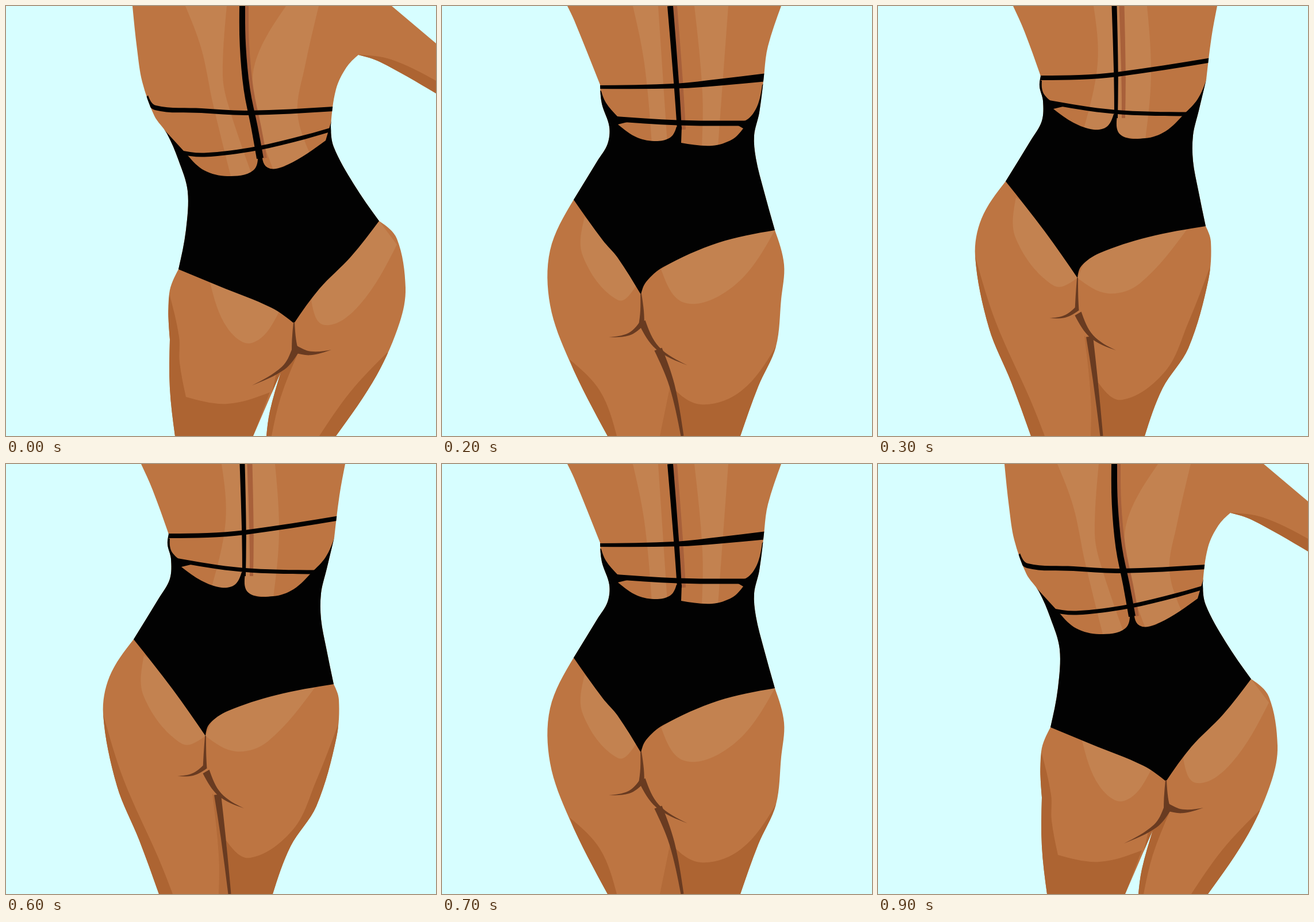
Recreate the animation shown at these times as an HTML page with a canvas. Size 748 by 748 pixels, loop 1 s.

```html
<!DOCTYPE html>
<html lang="en">
<head>
<meta charset="utf-8">
<title>Swimsuit sway</title>
<style>
html, body { margin: 0; width: 100%; height: 100%; overflow: hidden; background: #d7feff; }
canvas { display: block; }
</style>
</head>
<body>
<canvas id="stage" width="748" height="748"></canvas>
<script>
const ctx = document.getElementById('stage').getContext('2d');
const COLORS = {
  sky: '#d7feff', skin: '#bd7542', light: '#c38250', tint: '#b36b39',
  shade: '#ad6432', spine: '#a8603a', crease: '#693b21', suit: '#020202'
};

// Curves run through a few "x,y" key points; "!" marks a sharp corner.
// Ribbons are [curve, start width, end width]. Everything but the crease is
// clipped to the skin, so inner shapes may run past its edge.
const poses = [
  {
    skin: '220,0! 228,75 237,132 258,191 280,222 300,268 316,322 313,390 300,458! 284,500 285,580! 285,665 294,748! 430,748! 478,637! 459,705 453,748! 574,748! 645,642 685,550 695,490 680,405 649,374! 605,310 570,245 565,208! 574,145 592,107 613,85! 650,97 748,152! 748,65! 671,0!',
    suit: '275,215! 308,251! 317,261! 345,286 385,296 430,286 438,252! 445,250! 455,281 490,276 556,234! 566,200! 700,300! 649,374! 600,436 545,492 501,552! 462,525 370,487 300,458! 200,400!',
    spine: ['411,0 412,70 419,145 432,210 442,265', 10, 12], shadow: 6,
    straps: [['244,158 260,177 340,182 420,186 570,179', 8], ['300,254 345,259 435,248 520,228 575,212', 7]],
    light: [
      '312,0! 340,75 360,170 392,300! 430,300! 386,170 377,120 384,0!',
      '487,0! 433,100 434,185 465,285! 530,260! 507,185 520,105 544,0!',
      '355,481! 385,560 428,586 475,532! 430,460!',
      '531,512! 555,555 615,520 680,415! 649,374! 580,420!'
    ],
    tint: [],
    shade: [
      '613,85! 670,93 748,130! 748,165! 640,110!',
      '284,500! 301,575 302,620 313,680! 385,692 459,672! 430,748! 270,748!',
      '664,602! 600,670 545,748! 690,748!',
      '470,640! 507,606! 478,680 462,748! 445,748!'
    ],
    crease: [['501,550 501,580 503,602', 2, 12], ['503,600 482,630 428,660', 13, 0], ['504,597 530,604 566,598', 13, 0]]
  },
  {
    skin: '215,0! 245,110 258,150 286,209 294,250 290,305 245,416! 229,490 229,540 245,627 288,748! 424,748! 423,660 413,598! 417,587! 428,597! 447,685 450,748! 565,748! 615,615 628,470 620,415 599,362! 555,280 547,245 543,184! 541,166! 549,150! 549,115! 570,70 593,45! 640,60 748,79! 748,0!',
    suit: '280,203! 303,237! 335,262 370,268 397,252 402,228! 410,228! 416,261! 470,250 518,225! 535,210! 541,180! 700,280! 599,362! 570,365 500,415 425,478 403,538! 350,493 245,416! 200,300!',
    spine: ['383,0 385,60 396,150 405,215 406,258', 6, 10], shadow: 5,
    straps: [['256,150 268,157 390,165 500,167 530,164 552,150', 7], ['295,230 350,231 430,222 540,211', 8]],
    light: [
      '302,0! 328,110 355,268! 396,268! 367,135 355,0!',
      '449,0! 413,85 428,155 450,262! 468,262! 475,160 505,0!',
      '272,436! 305,540 340,559 385,522! 350,440!',
      '428,485! 470,533 535,500 580,430 597,355! 500,390!'
    ],
    tint: ['229,538! 265,595 330,620 413,592! 365,632! 320,635 243,627! 215,600!'],
    shade: [
      '593,45! 650,40 748,53! 748,95! 640,75!',
      '259,668! 300,710 350,724 405,705 423,655! 435,748! 270,748!',
      '428,597! 440,645 465,688 540,702 606,645! 590,748! 440,748!'
    ],
    crease: [['403,538 411,565 412,590', 1, 10], ['412,586 395,612 364,632', 10, 0], ['411,570 428,597 455,612', 10, 0]]
  },
  {
    skin: '218,0! 230,25 275,137! 278,170 291,210 288,240 270,270 229,337! 188,425 188,520 222,618 288,748! 519,748! 550,662 581,592 590,510 595,450 579,390! 560,322 546,265 543,225 552,185 561,112! 567,70 590,0!',
    suit: '265,140! 277,148! 285,168 305,192! 330,200! 306,206! 340,229 375,235 398,228 408,210! 417,210! 416,238! 470,243 505,232 524,213! 505,202! 530,198 548,175 557,137! 580,120! 700,250! 579,390! 480,412 385,454 355,480 346,502! 305,437 280,408 229,337! 150,250!',
    spine: ['397,0 408,138 413,215', 10, 8], shadow: 7,
    straps: [['265,141 410,139 480,133 565,124', 6, 14], ['295,196 410,203 530,204', 9]],
    light: [
      '332,0! 352,100 365,240! 392,240! 376,0!',
      '439,0! 453,150 452,245! 480,245! 498,0!',
      '248,367! 245,435 305,511 338,486! 320,430!',
      '381,458! 425,517 510,485 579,390! 470,400!'
    ],
    tint: ['379,748! 397,660! 416,748!'],
    shade: [
      '222,615! 275,670 304,748! 270,748!',
      '397,660! 450,693 520,670 581,592! 600,748! 419,748!'
    ],
    crease: [['346,500 348,530 347,556', 2, 10], ['347,553 325,571 290,576', 9, 0], ['348,550 375,595 427,625', 13, 0], ['376,597 400,660 418,748', 14, 5]]
  },
  {
    skin: '235,0! 255,45 283,122! 281,140 287,165 285,200 265,235 222,305! 180,370 169,435 193,560 232,655 266,748! 464,748! 495,665 540,595 575,475 579,410 570,383! 557,320 548,270 548,225 558,182 571,128! 580,55 590,0!',
    suit: '270,125! 285,130! 287,150 300,165! 330,173! 305,179! 340,203 375,215 398,210 410,188! 416,190! 422,224 465,230 500,218 532,188! 556,162 572,126! 700,200! 570,383! 470,402 385,430 354,452 347,473! 290,392 222,305! 150,250!',
    spine: ['411,0 414,118 414,195', 9, 6], shadow: 13,
    straps: [['270,125 350,124 416,119 580,94', 8], ['295,167 410,184 540,188', 7]],
    light: [
      '375,0! 382,100 356,220! 465,232! 475,120 468,0!',
      '240,333! 240,405 305,486 347,473! 300,370!',
      '347,473! 400,500 455,483 540,385! 370,420!'
    ],
    tint: ['359,573! 370,680 370,748! 390,748! 372,590!'],
    shade: [
      '169,435! 205,550 265,685 290,748! 240,748! 150,600!',
      '577,455! 540,550 500,635 425,685 383,655! 390,748! 500,748! 600,600!'
    ],
    crease: [['347,473 346,505 346,530', 2, 7], ['346,527 325,540 298,543', 8, 0], ['348,535 372,575 414,599', 13, 0], ['368,575 378,650 389,748', 12, 5]]
  },
  {
    skin: '237,0! 245,25 278,102! 277,140 288,185 275,218 220,290! 178,375 174,480 187,560 236,672 257,748! 425,748! 455,690 530,595 550,535 575,460 581,405 571,370! 544,275 543,240 552,190 570,120! 575,90! 588,0!',
    suit: '265,105! 279,108! 294,148! 318,160! 306,167! 350,196 391,204! 412,198 417,178! 422,178! 421,211! 475,218 510,207 536,180! 556,155 572,116! 700,200! 571,370! 470,397 385,434 362,455 357,484! 345,432 300,368 220,290! 150,220!',
    spine: ['416,0 421,90 419,185', 7, 6], shadow: 10,
    straps: [['270,104 350,108 420,105 500,99 585,85', 6], ['290,150 417,174 540,181', 7]],
    light: [
      '369,0! 382,100 345,215! 474,220! 480,120 457,0!',
      '231,298! 232,395 300,482 357,484! 340,390!',
      '357,484! 410,495 490,462 532,375! 380,420!'
    ],
    tint: ['363,575! 362,748! 378,748! 375,620!'],
    shade: [
      '172,430! 205,560 258,690 276,748! 200,748! 150,600!',
      '577,450! 515,590 430,695 400,748! 500,748! 600,600!'
    ],
    crease: [['357,484 357,500 353,516', 2, 9], ['354,513 335,529 299,528', 9, 0], ['362,546 383,566 412,580', 9, 0], ['353,514 363,565 383,675 379,748', 9, 4]]
  }
];

function parse(text) {
  return text.split(' ').map(token => {
    const [x, y] = token.split(',').map(parseFloat);
    return { x, y, corner: token.endsWith('!') };
  });
}

// Handle leaving b towards c, parallel to the chord a-c.
function handle(a, b, c) {
  const chord = Math.hypot(c.x - a.x, c.y - a.y) || 1;
  const k = Math.hypot(c.x - b.x, c.y - b.y) / 3 / chord;
  return { x: b.x + (c.x - a.x) * k, y: b.y + (c.y - a.y) * k };
}

const middle = (a, b) => ({ x: (a.x + b.x) / 2, y: (a.y + b.y) / 2 });

function smooth(pts) {
  const path = new Path2D(), n = pts.length;
  path.moveTo(pts[0].x, pts[0].y);
  pts.forEach((p, i) => {
    const q = pts[(i + 1) % n];
    let c1 = p.corner ? null : handle(pts[(i + n - 1) % n], p, q);
    let c2 = q.corner ? null : handle(pts[(i + 2) % n], q, p);
    if (!c1 && !c2) return path.lineTo(q.x, q.y);
    c1 = c1 || middle(p, c2);
    c2 = c2 || middle(q, c1);
    path.bezierCurveTo(c1.x, c1.y, c2.x, c2.y, q.x, q.y);
  });
  path.closePath();
  return path;
}

const outline = text => smooth(parse(text));

function ribbon([text, from, to = from]) {
  const pts = parse(text), last = pts.length - 1;
  const edge = side => pts.map((p, i) => {
    const a = pts[Math.max(i - 1, 0)], b = pts[Math.min(i + 1, last)];
    const half = side * (from + (to - from) * i / last) / 2 / Math.hypot(b.x - a.x, b.y - a.y);
    return { x: p.x - (b.y - a.y) * half, y: p.y + (b.x - a.x) * half, corner: i === 0 || i === last };
  });
  return smooth([...edge(1), ...edge(-1).reverse()]);
}

const shift = ([text, ...widths], dx) =>
  [parse(text).map(p => `${p.x + dx},${p.y}`).join(' '), ...widths];

const figures = poses.map(pose => ({
  skin: outline(pose.skin),
  layers: [
    ['light', pose.light.map(outline)],
    ['tint', pose.tint.map(outline)],
    ['shade', pose.shade.map(outline)],
    ['spine', [ribbon(shift(pose.spine, pose.shadow))]],
    ['suit', [outline(pose.suit), ...[pose.spine, ...pose.straps].map(ribbon)]]
  ],
  crease: pose.crease.map(ribbon)
}));

function paint(color, paths) {
  ctx.fillStyle = COLORS[color];
  for (const path of paths) ctx.fill(path);
}

function draw({ skin, layers, crease }) {
  ctx.fillStyle = COLORS.sky;
  ctx.fillRect(0, 0, 748, 748);
  ctx.save();
  ctx.clip(skin);
  ctx.fillStyle = COLORS.skin;
  ctx.fillRect(0, 0, 748, 748);
  for (const [color, paths] of layers) paint(color, paths);
  ctx.restore();
  paint('crease', crease);
}

// Sway to the far pose and back, 100 ms per step.
function tick() {
  const step = Math.floor(performance.now() / 100) % 10;
  draw(figures[Math.min(step, 9 - step)]);
  requestAnimationFrame(tick);
}
tick();
</script>
</body>
</html>
```
